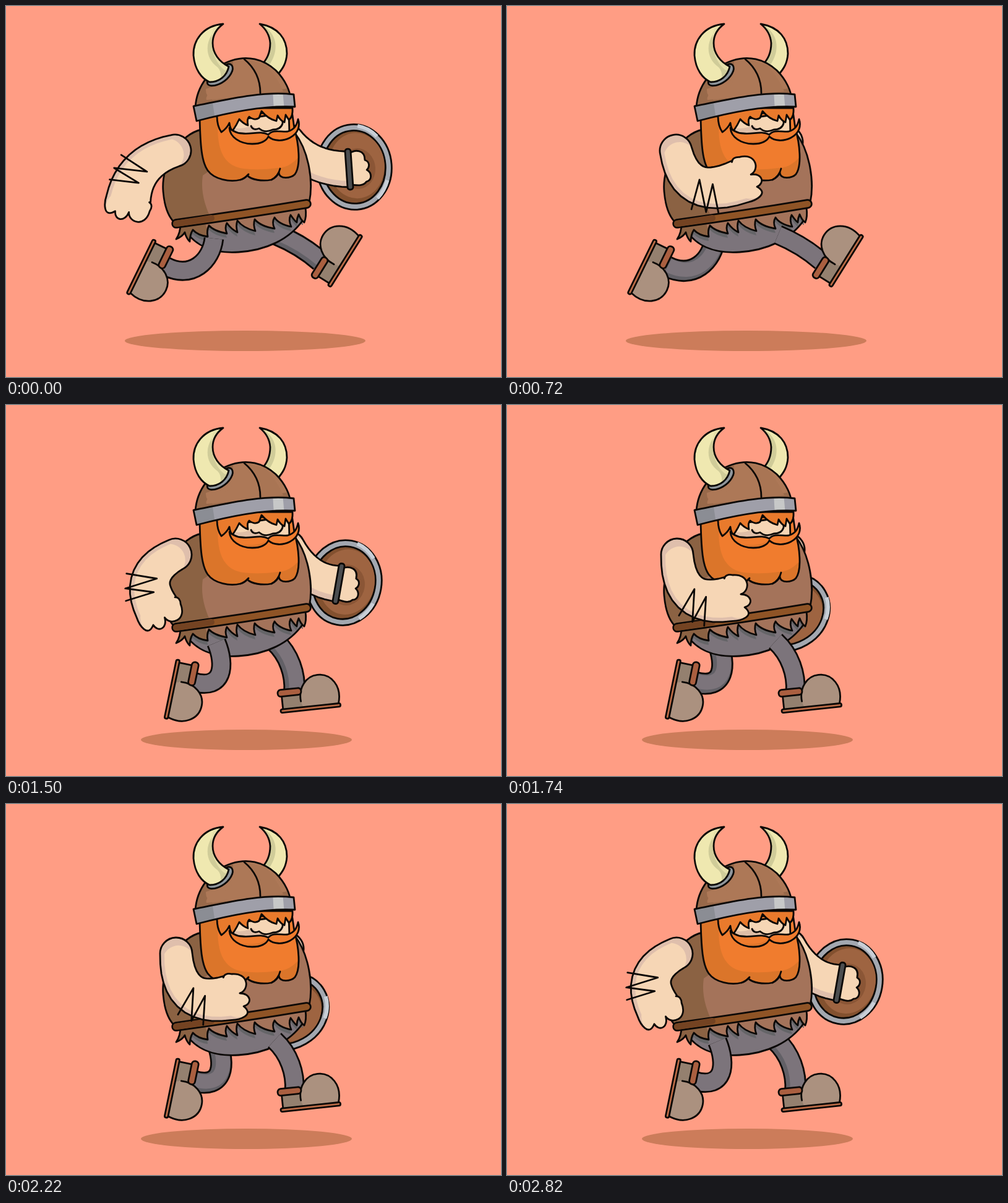
An HTML page that plays this animation: 800 by 600 pixels, repeating every 2880 ms.

```html
<!DOCTYPE html>
<html lang="en">
<head>
<meta charset="utf-8">
<title>Running viking</title>
<style>
html, body { margin: 0; width: 100%; height: 100%; overflow: hidden; background: #ff9d84; }
svg { display: block; width: 800px; height: 600px; }
.o { stroke: #0b0806; stroke-width: 2.8; stroke-linejoin: round; stroke-linecap: round; }
.n { fill: none; }
</style>
</head>
<body>
<svg viewBox="0 0 800 600">
  <defs>
    <path id="pantsShape" d="M292 366C312 394 346 400 376 398C420 395 458 378 480 346L476 332L290 352Z"/>
    <path id="furShape" d="M282 352Q282 367 275 377Q285 373 289 366Q291 375 297 381Q297 370 302 362Q310 371 326 373Q324 363 328 355Q336 364 357 368Q353 358 357 351Q364 361 374 366Q371 355 374 347Q383 359 403 364Q399 354 402 345Q411 356 434 360Q429 350 434 342Q441 353 461 357Q456 346 460 338Q466 347 470 350Q470 343 473 337Q477 347 482 350Q486 341 484 326Z"/>
    <path id="vestShape" d="M316 200C283 206 250 254 254 300C256 325 262 340 272 350L490 318C497 285 490 235 466 204Z"/>
    <path id="beardShape" d="M313 180C314 225 316 252 326 266C337 281 362 285 379 281Q386 279 390 274C396 281 414 284 429 281Q438 277 441 269C441 281 461 279 467 272C477 258 473 222 466 198L462 170Z"/>
    <path id="domeShape" d="M306 164C308 130 330 99 365 88C390 80 415 85 436 104C452 120 459 138 460 150Z"/>
    <path id="bandShape" d="M303 162C350 153 410 137 465 143L467 163C420 160 360 172 308 186Z"/>
    <path id="hornL" d="M351 29C318 32 302 56 303 80C305 103 316 117 329 123C345 123 357 113 360 98C344 90 334 76 334 60C334 48 340 37 351 29Z"/>
    <path id="hornR" d="M410 29C440 34 454 53 454 77C453 93 447 102 438 112L412 96C423 86 427 74 427 60C426 47 420 37 410 29Z"/>
    <clipPath id="pantsClip"><use href="#pantsShape"/></clipPath>
    <clipPath id="furClip"><use href="#furShape"/></clipPath>
    <clipPath id="vestClip"><use href="#vestShape"/></clipPath>
    <clipPath id="beardClip"><use href="#beardShape"/></clipPath>
    <clipPath id="domeClip"><use href="#domeShape"/></clipPath>
    <clipPath id="bandClip"><use href="#bandShape"/></clipPath>
    <clipPath id="hornLClip"><use href="#hornL"/></clipPath>
    <clipPath id="hornRClip"><use href="#hornR"/></clipPath>
  </defs>

  <rect width="800" height="600" fill="#ff9d84"/>
  <ellipse id="shadow" cy="541.5" ry="16.5" fill="#cc7c5a"/>
  <g id="farLeg"></g>
  <g id="farArm"></g>

  <g class="bob">
    <use href="#pantsShape" fill="#7c747b"/>
    <use href="#furShape" y="7" fill="#656568" clip-path="url(#pantsClip)"/>
    <use href="#pantsShape" class="o n"/>
  </g>
  <g id="nearLeg"></g>

  <g class="bob">
    <use href="#furShape" fill="#a4735a"/>
    <path d="M270 345H320L334 390H270Z" fill="#8b6243" clip-path="url(#furClip)"/>
    <use href="#furShape" class="o n"/>
    <use href="#vestShape" fill="#8b6243"/>
    <path d="M318 274C314 300 322 325 332 345L500 330V190H440Z" fill="#a4735a" clip-path="url(#vestClip)"/>
    <use href="#vestShape" class="o n"/>
    <path d="M275 352Q385 337 486 320" class="n" stroke="#0b0806" stroke-width="15.5" stroke-linecap="round"/>
    <path d="M275 352Q385 337 486 320" class="n" stroke="#8f5426" stroke-width="10" stroke-linecap="round"/>
    <path d="M275 352L332 343" class="n" stroke="#744322" stroke-width="10" stroke-linecap="round"/>

    <use href="#hornR" fill="#efe8b0"/>
    <path d="M410 29C436 40 446 70 422 100L404 100L404 29Z" fill="#d0cc99" clip-path="url(#hornRClip)"/>
    <use href="#hornR" class="o n"/>

    <use href="#beardShape" fill="#db752a"/>
    <path d="M343 178C340 218 344 258 384 263Q410 266 438 262Q462 262 480 235L470 160Z" fill="#f07c2e" clip-path="url(#beardClip)"/>
    <use href="#beardShape" class="o n"/>
    <path d="M379 281Q386 279 392 272M429 281Q440 275 443 263" class="o n"/>

    <path d="M362 186L457 172L458 206Q440 214 424 208Q390 212 370 205Z" fill="#f6d6b5" class="o"/>
    <path d="M366 196Q380 201 398 193L408 200Q420 205 432 200L444 204L424 207Q390 211 371 205Z" fill="#dfbea7"/>
    <path d="M396 194Q399 202 409 198Q418 206 431 200Q444 200 447 190Q448 183 441 181" class="o n"/>
    <path d="M341 178Q341 194 348 204Q357 198 361 189Q362 198 366 202Q373 192 377 183Q383 190 391 193Q389 182 393 179Q402 186 409 181L413 170Q424 183 437 186L439 177Q444 186 450 188L452 176L457 184Q464 180 463 165L360 165Z" fill="#e97a2c" class="o"/>
    <path d="M424 208C411 201 397 208 382 206C371 206 362 199 361 197C362 212 378 223 398 223C412 223 421 218 424 211C432 219 448 219 459 213C472 206 476 194 472 183C470 193 466 200 455 203C445 204 431 199 424 208Z" fill="#f07c2e" class="o"/>
    <path d="M364 203C371 217 388 220 402 218Q414 217 421 212C413 224 378 225 364 203Z" fill="#db752a"/>

    <use href="#domeShape" fill="#ad7857"/>
    <path d="M300 170C305 120 340 90 366 86C372 104 350 128 323 134Q322 146 334 152L464 132V170Z" fill="#98694a" clip-path="url(#domeClip)"/>
    <path d="M324 152Q320 138 360 130Q374 110 370 86H386Q410 112 411 144Z" fill="#ad7857" clip-path="url(#domeClip)"/>
    <path d="M385 86Q408 105 411 141L448 138Q438 114 420 95Z" fill="#a97554" clip-path="url(#domeClip)"/>
    <use href="#domeShape" class="o n"/>
    <path d="M385 86C402 100 411 118 411 141" class="o n"/>
    <use href="#bandShape" fill="#9f9fa9"/>
    <path d="M300 160L333 150L338 184L300 190Z" fill="#8b8d94" clip-path="url(#bandClip)"/>
    <path d="M431 135H447L450 170H433Z" fill="#c7c8c8" clip-path="url(#bandClip)"/>
    <use href="#bandShape" class="o n"/>

    <path d="M326 121C322 131 337 131 349 124C361 117 370 103 365 96Q362 92 356 95Z" fill="#8f969c" class="o"/>
    <use href="#hornL" fill="#efe8b0"/>
    <path d="M351 29C320 48 318 82 342 99Q350 107 346 126L370 110V29Z" fill="#d0cc99" clip-path="url(#hornLClip)"/>
    <path d="M335 36C328 58 334 90 354 104L364 98L334 66L348 30Z" fill="#e6dfaa" clip-path="url(#hornLClip)"/>
    <use href="#hornL" class="o n"/>
  </g>
  <g id="nearArm"></g>
</svg>

<script>
const INK = '#0b0806', SKIN = '#f6d6b5', SKIN_SHADE = '#dfbfac';
const el = id => document.getElementById(id);
const deg = radians => radians * 180 / Math.PI;

// Leg poses from back to front: hip, two bends, ankle, boot angle.
const LEGS = [
  [336, 376, 332, 412, 300, 443, 258, 421, 116],
  [340, 384, 355, 420, 352, 462, 303, 448, 101.6],
  [384, 388, 414, 420, 410, 452, 378, 464, 50],
  [434, 382, 458, 404, 468, 436, 466, 464, -6],
  [438, 370, 462, 380, 484, 392, 508, 413, -58]
];
const PLANTED = [392, 388, 398, 420, 396, 450, 392, 484, 0];
const BOOT_AT = [[257, 408], [302, 436.5], [376, 464], [460, 465], [508.5, 422]];

// Arm poses: shoulder, bend, wrist.
const NEAR_ARMS = [
  [[273, 234], [208, 251], [198, 312]],
  [[274, 242], [213, 271], [243, 327]],
  [[275, 250], [252, 320], [312, 338]],
  [[275, 242], [278, 330], [358, 314]],
  [[273, 234], [290, 318], [376, 284]]
];
const FAR_ARMS = [
  [[455, 217], [490, 264], [555, 264], -4],
  [[457, 230], [486, 286], [538, 289], 10],
  [[457, 242], [466, 310], [508, 322], 32],
  [[455, 234], [440, 300], [448, 330], 60],
  [[452, 220], [420, 275], [392, 304], 90]
];

// Fist outline at the wrist, x along the arm; three points per curve.
const FIST = [[12, 38], [38, 36], [23, 18], [38, 17], [39, 0], [21, -4],
              [38, -6], [42, -34], [14, -37], [8, -40], [2, -39], [0, -34]];

const path = (d, fill, outlined) =>
  `<path d="${d}" fill="${fill}"${outlined ? ' class="o"' : ''}/>`;

function along([s, c, e], t) {
  const mix = i => (1 - t) ** 2 * s[i] + 2 * t * (1 - t) * c[i] + t * t * e[i];
  const slope = i => (1 - t) * (c[i] - s[i]) + t * (e[i] - c[i]);
  return { x: mix(0), y: mix(1), a: Math.atan2(slope(1), slope(0)) };
}

function place(p, [x, y]) {
  const c = Math.cos(p.a), s = Math.sin(p.a);
  return `${(p.x + x * c - y * s).toFixed(1)} ${(p.y + x * s + y * c).toFixed(1)}`;
}

// Tapered limb with a round shoulder; trim pulls in one edge to leave a shade strip.
function limb(curve, w0, w1, fist, trim = 0) {
  const edge = (i, side, cut) => {
    const t = i / 12;
    return place(along(curve, t), [0, side * (w0 + (w1 - w0) * t - cut)]);
  };
  const steps = [...Array(13).keys()];
  const end = along(curve, 1);
  const outer = steps.map(i => edge(i, 1, trim));
  const inner = steps.map(i => edge(12 - i, -1, 0));
  const tip = fist ? 'C' + fist.map(p => place(end, p)).join(' ') : '';
  return `M${outer.join('L')}${tip}L${inner.join('L')}A${w0} ${w0} 0 0 0 ${outer[0]}Z`;
}

function drawNearArm(curve) {
  const mid = along(curve, 0.5);
  const whole = limb(curve, 26, 36, FIST);
  return path(whole, SKIN_SHADE) + path(limb(curve, 26, 36, FIST, 7), SKIN) +
    path(whole, 'none', true) +
    `<path class="o n" stroke-width="2.2" transform="translate(${mid.x} ${mid.y}) rotate(${deg(mid.a) - 110})"
      d="M-41 -5L8 3L-43 19L3 25L-42 39"/>`;
}

function drawFarArm([s, c, e, angle]) {
  const curve = [s, c, e];
  const at = `<g transform="translate(${e}) rotate(${angle})">`;
  const oval = (x, y, rx, ry, fill, extra = '') =>
    `<ellipse cx="${x}" cy="${y}" rx="${rx}" ry="${ry}" fill="${fill}" ${extra}/>`;
  const whole = limb(curve, 26, 29);
  return at + oval(8, -3, 60.5, 69, '#a3a8b0', 'class="o"') +
    '<path d="M18 -69A58 66 0 0 1 48 -50M60 22A58 66 0 0 1 42 50" class="n" stroke="#c8ced6" stroke-width="6"/>' +
    oval(8, -3, 50.5, 59, '#83512f', 'class="o"') + oval(12, -5, 45, 53, '#9e6441') +
    oval(13, 0, 29, 33, '#8b5636') + '</g>' +
    path(whole, SKIN_SHADE) + path(limb(curve, 26, 29, null, 10), SKIN) + path(whole, 'none', true) +
    at + path('M0 -25C12 -32 27 -30 26 -13C34 -10 33 -1 28 3C36 8 36 20 26 22C20 30 8 26 0 25Z', SKIN, true) +
    '<rect x="-5" y="-33" width="9" height="66" rx="4" fill="#4c4e50" class="o"/></g>';
}

function drawLeg([x0, y0, x1, y1, x2, y2, x3, y3, angle], boot, width, shaded) {
  const d = `M${x0} ${y0}C${x1} ${y1} ${x2} ${y2} ${x3} ${y3}`;
  const tube = (color, w, extra = '') =>
    `<path d="${d}" fill="none" stroke="${color}" stroke-width="${w}" ${extra}/>`;
  const cloth = shaded
    ? tube('#626066', width) + tube('#7c747b', width - 7, 'transform="translate(2.8 -1.8)"')
    : tube('#7c747b', width);
  return tube(INK, width + 5.6) + cloth +
    `<g transform="translate(${boot}) rotate(${angle})">` +
    path('M-15 0V27H44V3Z', '#94806f', true) +
    path('M16 20C10 -1 26 -24 46 -24C68 -24 84 -2 75 26H18Z', '#ab917f') +
    '<path d="M15 16C13 -6 27 -24 46 -24C68 -24 84 -2 75 26" class="o n"/>' +
    '<rect x="-19" y="25.500" width="97" height="5.500" rx="2.700" fill="#bd6c47" class="o"/>' +
    '<rect x="-21" y="-6" width="38" height="11" rx="5" fill="#aa5f40" class="o"/></g>';
}

function draw(time) {
  const step = Math.floor(time / 60) % 8;
  const pose = 4 - Math.abs(4 - step);
  const lift = Math.cos(pose * Math.PI / 2);
  const passing = pose === 2;

  document.querySelectorAll('.bob').forEach(g =>
    g.setAttribute('transform', `translate(0 ${8 - 8 * lift})`));
  el('shadow').setAttribute('cx', 388.5 - 2 * lift);
  el('shadow').setAttribute('rx', 170.5 + 24 * lift);
  el('farLeg').innerHTML = passing
    ? drawLeg(PLANTED, [390, 486], 30, true)
    : drawLeg(LEGS[4 - pose], BOOT_AT[4 - pose], 30, true);
  el('nearLeg').innerHTML = drawLeg(LEGS[pose], BOOT_AT[pose], 27, false);
  el('farArm').innerHTML = drawFarArm(FAR_ARMS[pose]);
  el('nearArm').innerHTML = drawNearArm(NEAR_ARMS[pose]);
}

const start = performance.now();
function tick() {
  draw((performance.now() - start) % 2880);
  requestAnimationFrame(tick);
}
tick();
</script>
</body>
</html>
```
